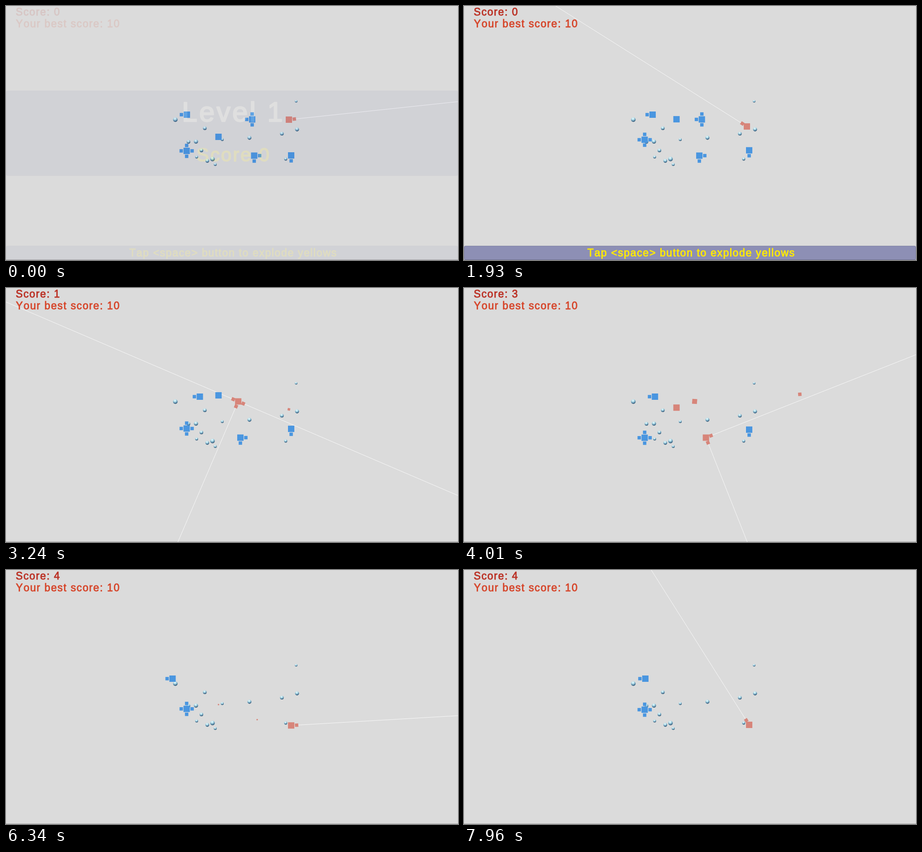
Write an HTML page that moves like this. It is 997 by 561 pixels and loops after 8 s.

```html
<!DOCTYPE html>
<html lang="en">
<head>
<meta charset="utf-8">
<title>Level 1</title>
<style>
  html, body { margin: 0; width: 100%; height: 100%; overflow: hidden; background: #dbdbdb; }
  svg { display: block; width: 100%; height: 100%; }
  text {
    font-family: "Liberation Sans", Arial, sans-serif;
    font-size: 23px;
    letter-spacing: .07em;
    font-kerning: none;
    stroke-width: .04em;
    stroke-linejoin: round;
    white-space: pre;
  }
  .panel { fill: rgb(60, 64, 141); fill-opacity: .49; stroke: rgb(50, 52, 100); stroke-opacity: .35; }
  .yellow { fill: #ffea04; stroke: #ffea04; }
  .white { fill: #fff; stroke: #fff; }
  .score { fill: #bb3226; stroke: #bb3226; }
  .best { fill: #d6472c; stroke: #d6472c; }
  .ray { stroke: #fff; stroke-opacity: .8; stroke-width: 1; }
</style>
</head>
<body>
<svg viewBox="0 0 997 561" preserveAspectRatio="none">
  <defs>
    <radialGradient id="ball" cx=".42" cy=".24" r=".8">
      <stop offset="0" stop-color="#effdff"/>
      <stop offset=".35" stop-color="#b4deea"/>
      <stop offset=".68" stop-color="#5f90ad"/>
      <stop offset="1" stop-color="#1e3a58"/>
    </radialGradient>
  </defs>
  <rect width="997" height="561" fill="#dbdbdb"/>
  <rect y="560" width="997" height="1" fill="#a3a3a3"/>
  <g id="balls"></g>
  <g id="rays"></g>
  <g id="units"></g>
  <g id="banner">
    <rect class="panel" x=".5" y="187.5" width="996" height="187" rx="3"/>
    <text class="white" x="388" y="255" style="font-size:61px">Level 1</text>
    <text class="yellow" x="420" y="342.5" style="font-size:41.6px">Score 0</text>
  </g>
  <g id="hint">
    <rect class="panel" x=".5" y="530" width="996" height="30.5" rx="3"/>
    <text class="yellow" x="272" y="553.3">Tap &lt;space&gt; button to explode yellows</text>
  </g>
  <g id="hud">
    <text class="score" id="score" x="21.5" y="21">Score: 0</text>
    <text class="best" x="21.8" y="46.8">Your best score: 10</text>
  </g>
</svg>
<script>
const LOOP = 8000;
const SPIN = -0.0734;        // degrees per ms
const SHOT_SPEED = 0.55;     // px per ms
const SHRINK_TIME = 1750;
const ARM = 12;
const BLUE = '#4a96e0', RED = '#d7857a';
const scoreTimes = [2331, 3650, 3717, 5069];

const byId = id => document.getElementById(id);
const clamp = v => Math.max(0, Math.min(1, v));

function add(parent, tag, attrs) {
  const node = document.createElementNS('http://www.w3.org/2000/svg', tag);
  for (const key in attrs) node.setAttribute(key, attrs[key]);
  parent.append(node);
  return node;
}
const addSquare = size =>
  add(byId('units'), 'rect', { x: -size / 2, y: -size / 2, width: size, height: size });

const balls = [
  [373.5, 251, 5], [438.5, 270, 4], [402.5, 300, 4], [419, 299.5, 4.6],
  [431, 319, 4], [420.5, 333.5, 3.2], [444, 342, 4.2], [455.5, 338, 5],
  [461.5, 350, 3.2], [477, 295, 3.2], [537, 291, 4.4], [608.5, 282, 4.1],
  [642, 272.5, 4.4], [640, 210.5, 2.8], [617, 338, 3.4]
];
for (const [cx, cy, r] of balls) add(byId('balls'), 'circle', { cx, cy, r, fill: 'url(#ball)' });

// path: [time, position] corners along one axis; arms: start angles;
// hit: turns red and spins; fire: arms fly off; stops: when each shot lands
const units = [
  { y: 240, arms: [180], path: [[0, 399], [3600, 430.7], [6370, 366.7], [7960, 400]] },
  { x: 398.5, arms: [0, 90, 180, 270],
    path: [[0, 320], [2435, 289], [4790, 351.4], [7095, 285], [7960, 308.5]] },
  { x: 468.7, arms: [], hit: 3650, fire: 4950, path: [[0, 289], [3000, 228.6], [4950, 297.3]] },
  { y: 250.5, arms: [180, 270, 90], hit: 2331, fire: 3610, stops: [3717, 3650],
    path: [[0, 543], [3610, 508.7]] },
  { y: 330.5, arms: [0, 90], hit: 3717, fire: 4955, stops: [, 5069],
    path: [[0, 547.5], [2767, 506.8], [4955, 554]] },
  { x: 629, arms: [90], hit: 5069,
    path: [[0, 330], [3682, 308.5], [7000, 352], [7960, 342]] },
  { x: 624, arms: [0], hit: -82, fire: 2180, stops: [2331], path: [[0, 251], [2180, 268]] }
];
for (const unit of units) {
  unit.shots = unit.arms.map(() => ({ node: addSquare(7.5), ray: add(byId('rays'), 'line', { class: 'ray' }) }));
  unit.core = addSquare(14);
}

function along(path, t) {
  let i = 1;
  while (i < path.length - 1 && t > path[i][0]) i++;
  const [t0, v0] = path[i - 1], [t1, v1] = path[i];
  return v0 + (v1 - v0) * (t - t0) / (t1 - t0);
}

function place(node, x, y, angle = 0, scale = 1) {
  node.setAttribute('transform', `translate(${x} ${y}) rotate(${angle}) scale(${scale})`);
}

function show(node, on) {
  node.setAttribute('visibility', on ? 'visible' : 'hidden');
}

function drawUnit(unit, t) {
  const { hit = Infinity, fire = Infinity, stops = [] } = unit;
  const live = Math.min(t, fire);
  const pos = along(unit.path, live);
  const x = unit.x ?? pos, y = unit.y ?? pos;
  const spin = SPIN * Math.max(0, live - hit);
  const color = t >= hit ? RED : BLUE;
  const flown = Math.max(0, t - fire);
  const scale = clamp(1 - flown / SHRINK_TIME);

  unit.core.setAttribute('fill', color);
  show(unit.core, scale > 0);
  place(unit.core, x, y, flown * 0.012, scale);

  unit.shots.forEach(({ node, ray }, i) => {
    const angle = unit.arms[i] + spin;
    const dx = Math.cos(angle * Math.PI / 180), dy = Math.sin(angle * Math.PI / 180);
    const reach = ARM + flown * SHOT_SPEED;
    node.setAttribute('fill', color);
    show(node, t < (stops[i] ?? Infinity) && reach < 1200);
    place(node, x + dx * reach, y + dy * reach, angle);

    const aiming = t >= hit && t < fire;
    show(ray, aiming);
    if (!aiming) return;
    ray.setAttribute('x1', x + dx * ARM);
    ray.setAttribute('y1', y + dy * ARM);
    ray.setAttribute('x2', x + dx * 1200);
    ray.setAttribute('y2', y + dy * 1200);
  });
}

function draw(t) {
  const fadeIn = clamp(0.12 + t / 1000);
  byId('hud').style.opacity = fadeIn;
  byId('banner').style.opacity = fadeIn * clamp((1920 - t) / 200);
  byId('hint').style.opacity = fadeIn * clamp((2400 - t) / 200);
  byId('score').textContent = 'Score: ' + scoreTimes.filter(s => t >= s).length;
  units.forEach(unit => drawUnit(unit, t));
}

const start = performance.now();
function tick() {
  draw((performance.now() - start) % LOOP);
  requestAnimationFrame(tick);
}
tick();
</script>
</body>
</html>
```
